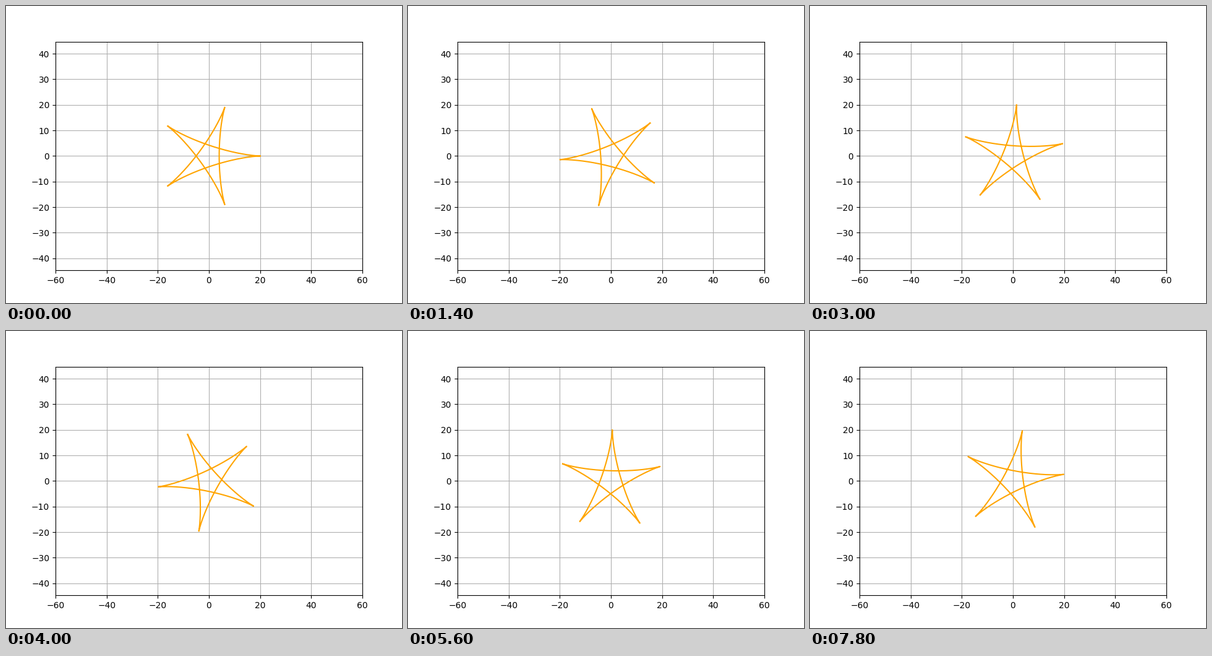
Animation of 640 by 480 pixels, one loop 8000 ms. Source, as a matplotlib script:

```python
import numpy as np
import matplotlib.pyplot as plt
from matplotlib.animation import FuncAnimation

FRAMES = 40
INTERVAL = 200
STEP = 0.1           # radians turned per frame
RING, WHEEL = 20, 8  # fixed and rolling circle radii

fig, ax = plt.subplots(figsize=(6.4, 4.8), dpi=100)
ax.set_aspect("equal", adjustable="datalim")
ax.set_xlim(-60, 60)
half_height = 60 * (4.8 * 0.77) / (6.4 * 0.775)
ax.set_ylim(-half_height, half_height)
ax.grid()

# Hypocycloid: closes after two turns, leaving five cusps
t = np.linspace(0, 4 * np.pi, 1001)
arm = RING - WHEEL
star = arm * np.exp(1j * t) + WHEEL * np.exp(-1j * t * arm / WHEEL)

line, = ax.plot([], [], color="orange", lw=1.5)


def draw(i):
    turned = star * np.exp(1j * STEP * i)
    line.set_data(turned.real, turned.imag)
    return line,


anim = FuncAnimation(fig, draw, frames=FRAMES, interval=INTERVAL,
                     init_func=lambda: draw(0), repeat=True, repeat_delay=0)
plt.show()
```
